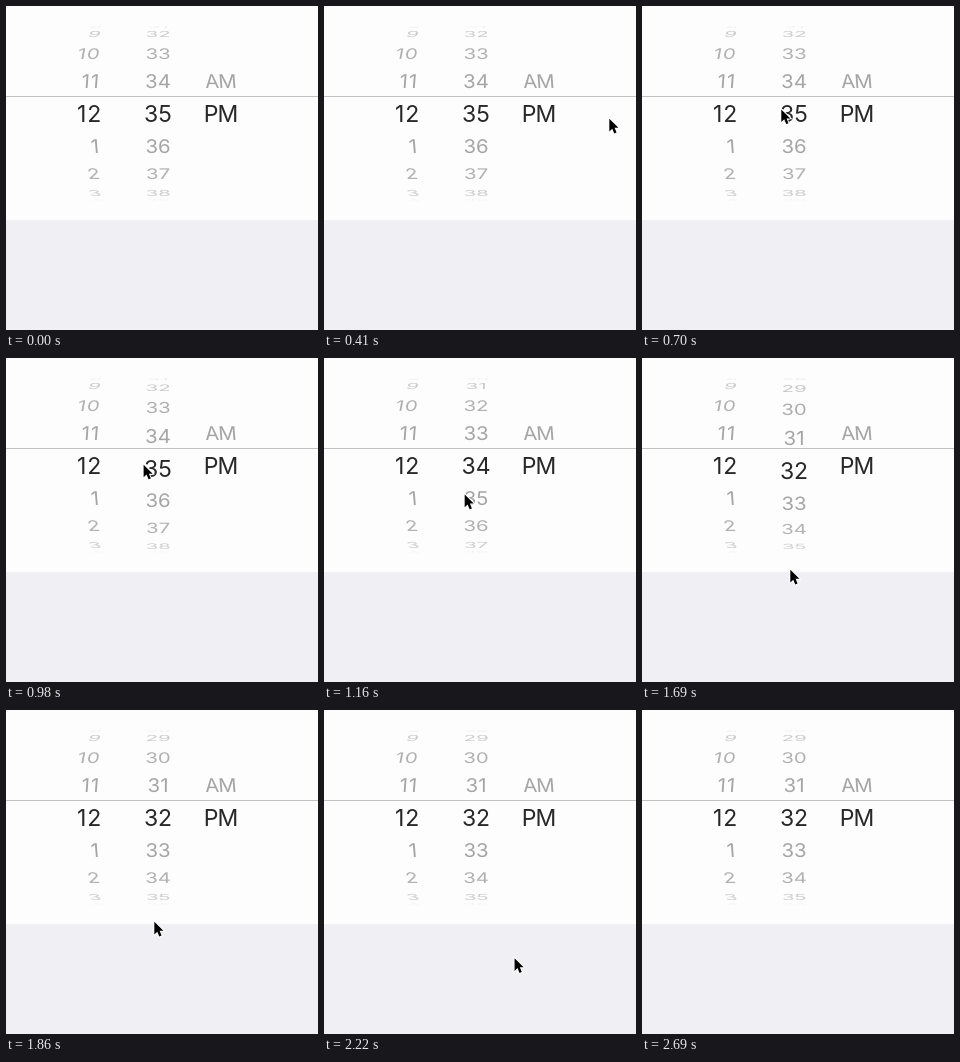
Write an HTML page with a canvas that moves like this. It is 312 by 324 pixels and loops after 2890 ms.

```html
<!DOCTYPE html>
<html lang="en">
<head>
<meta charset="utf-8">
<title>Time picker</title>
<style>
  html, body { margin: 0; width: 100%; height: 100%; overflow: hidden; background: #fdfdfd; }
  canvas { display: block; width: 100%; height: 100%; }
</style>
</head>
<body>
<canvas id="stage" width="312" height="324"></canvas>
<script>
const ctx = document.getElementById('stage').getContext('2d');
const LOOP = 2890, WIDTH = 312, HEIGHT = 324;
const CENTER = 107.5, RADIUS = 86.7, ROW_ANGLE = 0.383, ROW_HEIGHT = 33;
const BAND = { top: 91, bottom: 124 };
const STEP = 57.5;
const ENTER = 360, DRAG = 920, RELEASE = 1690, LEAVE = 2100;
const GRAB = { x: 136, y: 102 }, DROP = { x: 147, y: 210 }, EXIT = { x: 286, y: 330 };

const arrow = new Path2D('M.5 .7V15.6L4 12.3 6.3 18 9 16.9 6.7 11.3H11.2Z');

const lerp = (a, b, t) => a + (b - a) * t;
const smooth = t => t * t * (3 - 2 * t);
const handEase = t => smooth(t ** 1.45);

// The picture moves in even steps: share of the steps shown since start
function progress(time, start, steps) {
  const shown = Math.floor((time - start + 5) / STEP) + 1;
  return Math.min(1, Math.max(0, shown / steps));
}

function glide(from, to, t) {
  return { x: lerp(from.x, to.x, t), y: lerp(from.y, to.y, t) };
}

function pointerAt(time) {
  if (time < ENTER) return null;
  if (time < DRAG) {
    const away = (1 - progress(time, ENTER + STEP, 9) ** 1.5) ** 5.5;
    return { x: GRAB.x + 148 * away, y: GRAB.y + 9 * away - 12 * Math.sin(Math.PI * away) };
  }
  if (time < LEAVE) return glide(GRAB, DROP, handEase(progress(time, DRAG, 10)));
  return glide(DROP, EXIT, handEase(progress(time, LEAVE, 6)));
}

function minuteAt(time) {
  if (time < DRAG) return 35;
  const pulled = 35 - (pointerAt(Math.min(time, RELEASE)).y - GRAB.y) / ROW_HEIGHT;
  const settle = progress(time, RELEASE, 4);
  return lerp(pulled, 32, 1 - (1 - settle) ** 1.8);
}

function drawRows(column, size, right, color) {
  ctx.font = `400 ${size}px Inter, Roboto, sans-serif`;
  ctx.textAlign = column.align;
  ctx.letterSpacing = column.tracking + 'px';
  ctx.fillStyle = color;
  const offAxis = (WIDTH / 2 - column.x) / 62;
  for (let row = Math.ceil(column.value - 4.1); row <= column.value + 4.1; row++) {
    const label = column.label(row);
    const angle = (row - column.value) * ROW_ANGLE;
    if (!label || Math.abs(angle) >= Math.PI / 2) continue;
    const depth = Math.cos(angle), lean = 0.2 * offAxis * Math.sin(angle);
    ctx.save();
    ctx.globalAlpha = Math.min(1, 0.15 + depth);
    ctx.translate(column.x + right * offAxis + 4 * offAxis * (1 - depth), CENTER + RADIUS * Math.sin(angle));
    ctx.transform(1, 0, lean, Math.max(depth, 0.11), 0, 0);
    ctx.fillText(label, 0, size * 0.3636);
    ctx.restore();
  }
}

function clipped(areas, draw) {
  ctx.save();
  ctx.beginPath();
  for (const [top, bottom] of areas) ctx.rect(0, top, WIDTH, bottom - top);
  ctx.clip();
  draw();
  ctx.restore();
}

function drawPointer({ x, y }) {
  ctx.save();
  ctx.translate(x + 0.9, y + 1.2);
  ctx.scale(0.85, 0.85);
  ctx.lineWidth = 2.2;
  ctx.strokeStyle = '#fff';
  ctx.stroke(arrow);
  ctx.fillStyle = '#000';
  ctx.fill(arrow);
  ctx.restore();
}

function render(time) {
  const columns = [
    { x: 96, align: 'right', tracking: 0.8, value: 12, label: n => String((n + 11) % 12 + 1) },
    { x: 152, align: 'center', tracking: 0, value: minuteAt(time), label: String },
    { x: 214.6, align: 'center', tracking: -1, value: 1, label: n => ['AM', 'PM'][n] }
  ];

  ctx.fillStyle = '#fdfdfd';
  ctx.fillRect(0, 0, WIDTH, HEIGHT);
  ctx.fillStyle = '#efeff4';
  ctx.fillRect(0, 214, WIDTH, HEIGHT - 214);

  clipped([[0, BAND.top], [BAND.bottom, 194.5]],
    () => columns.forEach(c => drawRows(c, 20.4, c.align === 'right' ? -2.6 : 0, 'rgba(0, 0, 0, .35)')));
  clipped([[BAND.top, BAND.bottom]],
    () => columns.forEach(c => drawRows(c, 23, 0, '#282828')));

  ctx.fillStyle = '#c2c2c2';
  ctx.fillRect(0, 90, WIDTH, 1);

  const pointer = pointerAt(time);
  if (pointer) drawPointer(pointer);
}

const begin = performance.now();
function tick() {
  render((performance.now() - begin) % LOOP);
  requestAnimationFrame(tick);
}
tick();
</script>
</body>
</html>
```
